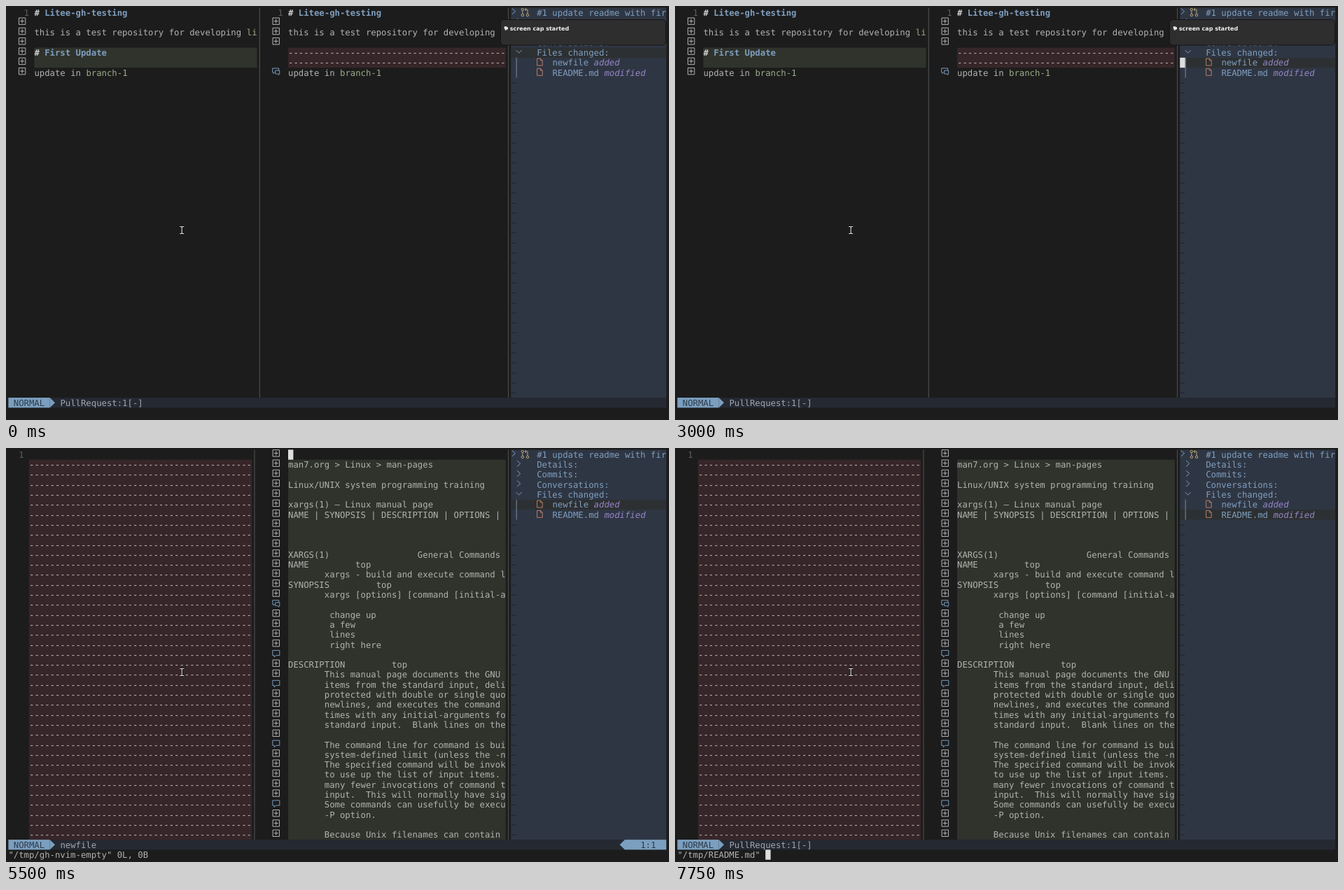
These frames come from a looping animation (947x592 px, 8000 ms). An HTML page:

```html
<!DOCTYPE html>
<html lang="en">
<head>
<meta charset="utf-8">
<title>Pull request review in the editor</title>
<style>
  html, body { margin: 0; width: 100%; height: 100%; overflow: hidden; background: #1c1c1c; }
  svg { display: block; width: 947px; height: 592px; }
  text { font: 12.29px "DejaVu Sans Mono", monospace; white-space: pre; text-rendering: geometricPrecision; }
  .bold { font-weight: bold; }
  .italic { font-style: italic; }
  .note { font: bold 8px "DejaVu Sans", sans-serif; }
</style>
</head>
<body>
<script>
const NS = 'http://www.w3.org/2000/svg';
const CW = 7.4, LH = 14.3, X0 = 3.4, Y0 = 2.4;
const LOOP = 8000;
const C = {
  bg: '#1c1c1c', side: '#2f3643', bar: '#252932', line: '#2d3032', split: '#464849',
  add: '#2f332c', del: '#372629', dash: '#c4bdbd', text: '#b2b2b0', head: '#d2d2d2',
  blue: '#7f9fc0', green: '#9bad87', purple: '#9586c8', num: '#5c5c5c', icon: '#b4b4b4',
  file: '#b77d66', pull: '#b8a377', mode: '#7b9fbf', cursor: '#dedede'
};

const px = col => X0 + col * CW;
const py = row => Y0 + row * LH;

function el(parent, tag, attrs) {
  const node = document.createElementNS(NS, tag);
  for (const key in attrs) node.setAttribute(key, attrs[key]);
  parent.appendChild(node);
  return node;
}
const group = parent => el(parent, 'g', {});
const show = (node, on) => node.setAttribute('visibility', on ? 'visible' : 'hidden');

function write(g, col, row, str, fill = C.text, cls = '') {
  const t = el(g, 'text', { x: px(col), y: py(row) + 11.4, fill, class: cls });
  t.textContent = str;
  return t;
}
function block(g, col, row, cols, rows, fill) {
  return el(g, 'rect', { x: px(col), y: py(row), width: cols * CW, height: rows * LH, fill });
}
function stroke(g, d, color, x = 0, y = 0, width = 1) {
  return el(g, 'path', {
    d, stroke: color, fill: 'none', 'stroke-width': width,
    'stroke-linejoin': 'round', transform: `translate(${x} ${y})`
  });
}

// Gutter signs, centred on x in the given row
const SIGNS = {
  plus: 'M-4.7-4.7H4.7V4.7H-4.7ZM-3 0H3M0-3V3',
  note: 'M-5-4H5V3.2H0L-2.6 5.6V3.2H-5Z',
  talk: 'M-1.5 1.5H-2L-3.8 3.3V1.5H-5V-4.2H4V-1M-1-1H5V3.8H4V5.4L2.2 3.8H-1Z'
};
function sign(g, kind, x, row) {
  stroke(g, SIGNS[kind], kind === 'plus' ? C.icon : '#789cbd', x, py(row) + 5);
}
function filler(g, col, row, cols, rows) {
  block(g, col, row, cols, rows, C.del);
  for (let i = 0; i < rows; i++) write(g, col, row + i, '-'.repeat(cols), C.dash);
}
function split(g, col) {
  el(g, 'rect', { x: px(col) + 3.1, y: py(0), width: 1.3, height: 39 * LH, fill: C.split });
}

function readmePane(g, col, old) {
  write(g, col - 2, 0, '1', C.num);
  write(g, col, 0, '#', C.head, 'bold');
  write(g, col + 2, 0, 'Litee-gh-testing', C.blue, 'bold');
  write(g, col, 2, 'this is a test repository for developing');
  if (old) {
    filler(g, col, 4, 42, 2);
  } else {
    write(g, col + 41, 2, 'li', C.green);
    block(g, col, 4, 43, 2, C.add);
    write(g, col, 4, '#', C.head, 'bold');
    write(g, col + 2, 4, 'First Update', C.blue, 'bold');
  }
  write(g, col, 6, 'update in');
  write(g, col + 10, 6, 'branch-1', C.green);
  const x = px(col) - 17.3;
  for (const row of old ? [1, 2, 3] : [1, 2, 3, 4, 5, 6]) sign(g, 'plus', x, row);
  if (old) sign(g, 'talk', x, 6);
}

const PAGE = `
man7.org > Linux > man-pages

Linux/UNIX system programming training

xargs(1) — Linux manual page
NAME | SYNOPSIS | DESCRIPTION | OPTIONS |



XARGS(1)                 General Commands
NAME         top
       xargs - build and execute command l
SYNOPSIS         top
       xargs [options] [command [initial-a

        change up
        a few
        lines
        right here

DESCRIPTION         top
       This manual page documents the GNU
       items from the standard input, deli
       protected with double or single quo
       newlines, and executes the command
       times with any initial-arguments fo
       standard input.  Blank lines on the

       The command line for command is bui
       system-defined limit (unless the -n
       The specified command will be invok
       to use up the list of input items.
       many fewer invocations of command t
       input.  This will normally have sig
       Some commands can usefully be execu
       -P option.

       Because Unix filenames can contain`.split('\n');

function manualView(g) {
  write(g, 2, 0, '1', C.num);
  filler(g, 4, 1, 43, 38);
  split(g, 47);
  block(g, 54, 1, 42, 38, C.add);
  const marks = { 15: 'talk', 20: 'note', 23: 'note', 29: 'note', 35: 'note' };
  PAGE.forEach((str, row) => {
    sign(g, marks[row] || 'plus', 385.8, row);
    if (str) write(g, 54, row, str);
  });
}

function sidebar(g) {
  const right = 'M-2.3-4.2L2.3 0L-2.3 4.2';
  stroke(g, right, C.blue, 725.2, 7.7);
  const pull = group(g);
  for (const [x, y] of [[737.8, 5], [737.8, 13], [745, 13]])
    el(pull, 'circle', { cx: x, cy: y, r: 1.7, fill: 'none', stroke: C.pull });
  stroke(pull, 'M737.8 6.7V11.3M745 11.3V5H741M743 3L741 5L743 7', C.pull);
  write(g, 102, 0, '#1 update readme with fir', C.blue);
  ['Details:', 'Commits:', 'Conversations:', 'Files changed:'].forEach((str, i) => {
    write(g, 102, i + 1, str, C.blue);
    if (i < 3) stroke(g, right, C.blue, 732.4, py(i + 1) + 5.6);
  });
  stroke(g, 'M-4-2L0 2L4-2', C.blue, 732.6, 65.2);
  [['newfile', 'added'], ['README.md', 'modified']].forEach(([name, what], i) => {
    const row = 5 + i;
    stroke(g, 'M-3.8-5H1L3.8-2.2V5H-3.8ZM1-5V-2.2H3.8', C.file, 762.4, py(row) + 6.2);
    write(g, 105, row, name, C.blue);
    write(g, 106 + name.length, row, what, C.purple, 'italic');
  });
  el(g, 'rect', { x: 728.6, y: py(5), width: 1.1, height: 2 * LH, fill: '#71869d' });
  for (let row = 7; row < 39; row++) write(g, 97, row, '~', '#1d2128');
}

const svg = el(document.body, 'svg', { viewBox: '0 0 947 592', width: 947, height: 592 });
el(svg, 'rect', { width: 947, height: 592, fill: C.bg });

const readme = group(svg);
readmePane(readme, 5, false);
split(readme, 48);
readmePane(readme, 54, true);
const manual = group(svg);
manualView(manual);
split(svg, 96);

block(svg, 97, 0, 127, 39, C.side).setAttribute('width', 30 * CW);
const cursorLine = block(svg, 97, 0, 30, 1, C.line);
sidebar(group(svg));

// Status line and command line
block(svg, 0, 39, 127, 1, C.bar);
const arrow = (g, col, from, to) => el(g, 'path', {
  d: `M${px(col + from)} ${py(39)}L${px(col + to)} ${py(39.5)}L${px(col + from)} ${py(40)}Z`, fill: C.mode
});
block(svg, 0, 39, 8, 1, C.mode);
arrow(svg, 8, 0, 1);
write(svg, 1, 39, 'NORMAL', '#2d3a4b');
const title = write(svg, 10, 39, '', '#a0a6b0');
const place = group(svg);
block(place, 119, 39, 8, 1, C.mode);
arrow(place, 118, 1, 0);
const placeText = write(place, 122, 39, '', '#2d3a4b');
const command = write(svg, 0, 40, '');
const keys = write(svg, 116, 40, '');
const cursor = block(svg, 0, 0, 1, 1, C.cursor);

const note = group(svg);
el(note, 'rect', { x: 706.5, y: 19.5, width: 236, height: 36.5, rx: 5, fill: '#2e2e2e', stroke: '#151515' });
el(note, 'path', { d: 'M711.7 29.2H715.2V30.6L717 29.9V33.7L715.2 33V34.4H712.6V32.6H711.7Z', fill: '#eeeeee' });
el(note, 'text', { x: 719.8, y: 34.5, fill: '#f2f2f2', class: 'note' }).textContent = 'screen cap started';

const beam = 'M-3-5H-1L0-4.3L1-5H3M0-4.3V4.3M-3 5H-1L0 4.3L1 5H3';
stroke(svg, beam, '#111111', 251.2, 320.5, 2.6);
stroke(svg, beam, '#e4e4e4', 251.2, 320.5, 1.1);

// Each step changes part of the editor state; cur is [column, row]
const STEPS = [
  [0, { page: 0, cur: null, line: 4, title: 'PullRequest:1[-]', pos: '', cmd: '', keys: '', note: true }],
  [250, { cur: [97, 4] }],
  [750, { cur: null }],
  [1000, { cur: [97, 4] }],
  [1250, { cur: [97, 5], line: 5 }],
  [1750, { cur: null }],
  [2000, { cur: [97, 5] }],
  [2500, { cur: null }],
  [2750, { cur: [97, 6], line: 6 }],
  [3000, { cur: [97, 5], line: 5 }],
  [3500, { cur: null }],
  [4000, { cur: [97, 5] }],
  [4250, { cur: null }],
  [4500, { cur: [9, 40], cmd: '"newfile"' }],
  [4750, { page: 1, cur: null, title: 'newfile', pos: '1:1', cmd: '"/tmp/gh-nvim-empty" 0L, 0B' }],
  [5000, { cur: [54, 0], note: false }],
  [5250, { cur: null }],
  [5500, { cur: [54, 0] }],
  [5750, { cur: [54, 1], pos: '2:1' }],
  [6000, { cur: [54, 2], pos: '3:1' }],
  [6250, { cur: null }],
  [6500, { cur: [54, 2], keys: '^W' }],
  [6750, { cur: [97, 6], line: 6, title: 'PullRequest:1[-]', pos: '', keys: '' }],
  [7250, { cur: null }],
  [7500, { cur: [97, 6] }],
  [7750, { cur: [17, 40], cmd: '"/tmp/README.md" ' }]
];

function draw(ms) {
  const s = {};
  for (const [at, change] of STEPS) if (at <= ms) Object.assign(s, change);
  show(readme, s.page === 0);
  show(manual, s.page === 1);
  show(note, s.note);
  show(place, s.pos);
  show(cursor, s.cur);
  if (s.cur) {
    cursor.setAttribute('x', px(s.cur[0]));
    cursor.setAttribute('y', py(s.cur[1]));
  }
  cursorLine.setAttribute('y', py(s.line));
  title.textContent = s.title;
  placeText.textContent = s.pos;
  command.textContent = s.cmd;
  keys.textContent = s.keys;
}

const start = performance.now();
function tick() {
  draw((performance.now() - start) % LOOP);
  requestAnimationFrame(tick);
}
tick();
</script>
</body>
</html>
```
